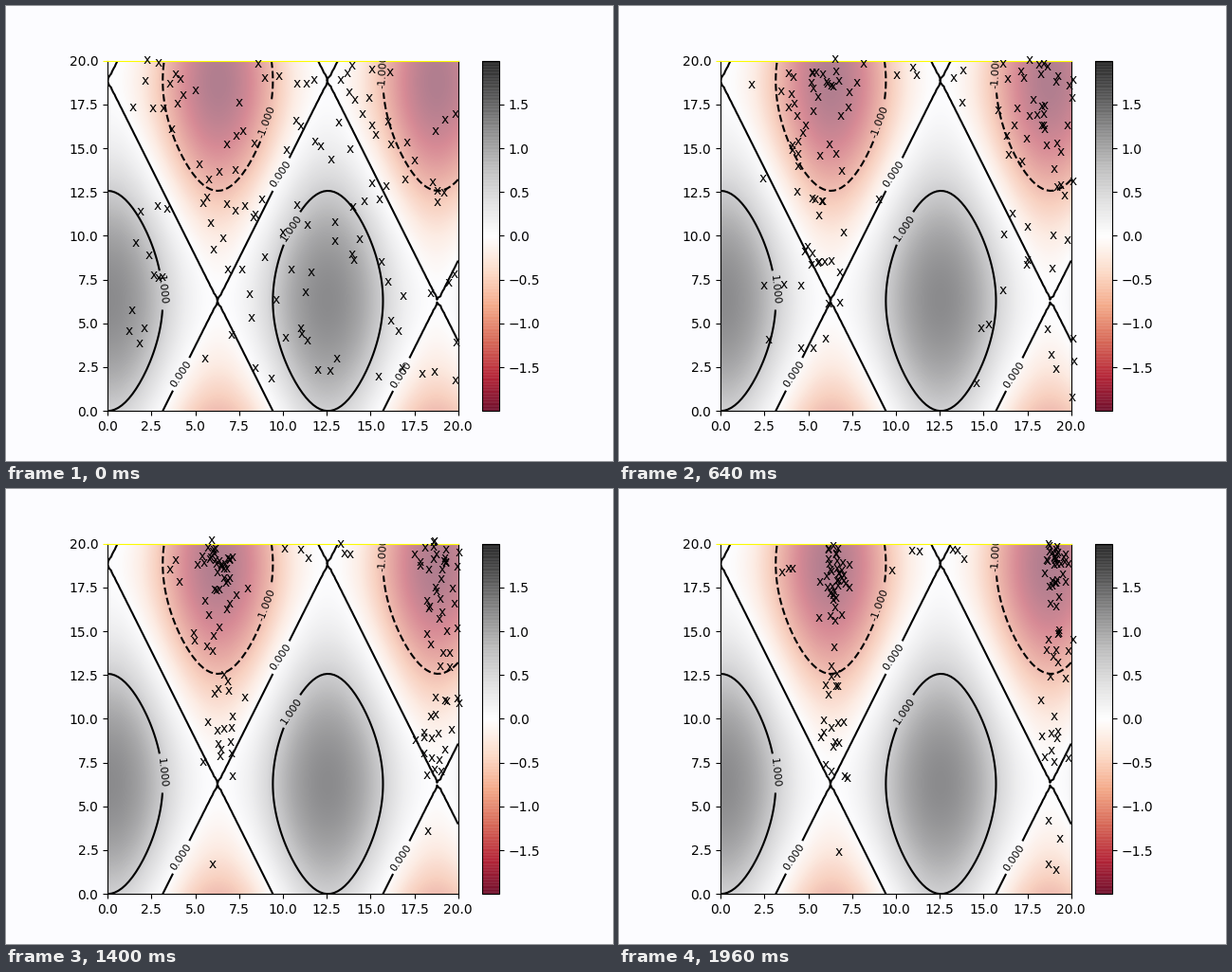
A matplotlib script that plays this animation: 640x480 px, repeating every 2000 ms.

```python
import numpy as np
import matplotlib.pyplot as plt
from matplotlib.animation import FuncAnimation

FRAMES, STEP_MS = 50, 40
SIZE = 120
PAPER, YELLOW = "#fcfcff", "#fcfc00"
LOW_X, LOW_Y = 2 * np.pi, 6 * np.pi    # lowest point; repeats 4 pi to the right

rng = np.random.default_rng(12)
# a few individuals stay stuck along the top edge
stuck_x = np.repeat([3.3, 10.3, 13.7], 3) + rng.normal(0, 0.5, 9)


def height(x, y):
    return np.cos(x / 2) + np.sin(y / 4)


def fold(v):
    """Reflect values back into 0..20."""
    v = np.abs(v)
    return np.where(v > 20, 40 - v, v)


def breed(gen):
    """Draw one generation: two columns that sway and tighten."""
    rest = 1 - gen / (FRAMES - 1)
    sway = 1.4 * rest * np.cos(2 * np.pi * (gen - 24) / 16)
    column = LOW_X + 4 * np.pi * (rng.random(SIZE) < 0.47)
    x = rng.normal(column + sway, 0.4 + 1.4 * rest ** 1.5)
    y = fold(rng.normal(LOW_Y, 0.5 + 0.5 * rest, SIZE))
    # flipped high bits of the coded y value
    for bit in range(1, 5):
        y -= 20 / 2 ** bit * (rng.random(SIZE) < 0.15 + 0.04 * bit)
    wild = rng.random(SIZE) < np.exp(-gen / 7)
    x = np.where(wild, rng.uniform(1, 20, SIZE), x)
    y = np.where(wild, rng.uniform(1.2, 20, SIZE), y)
    return np.column_stack([fold(x), fold(y)])


def evolve():
    history = []
    pop = breed(0)
    for gen in range(FRAMES):
        if gen:
            fresh = rng.random(SIZE) < 0.75
            pop = np.where(fresh[:, None], breed(gen), pop)
        stuck = np.column_stack([stuck_x + rng.normal(0, 0.08, len(stuck_x)),
                                 fold(rng.normal(19, 0.5, len(stuck_x)))])
        history.append(np.vstack([pop, stuck]))
    return history


history = evolve()

fig, ax = plt.subplots(figsize=(6.4, 4.8), dpi=100, facecolor=PAPER)
ax.set_facecolor(PAPER)

X, Y = np.meshgrid(np.linspace(0, 20, 100), np.linspace(0, 20, 100))
Z = height(X, Y)
lines = ax.contour(X, Y, Z, levels=[-1, 0, 1], colors="black")
ax.set(xlim=(0, 20), ylim=(0, 20))

# labels are placed before the axes become square, which sets their tilt
spots = [(9.02, 16.55), (15.72, 19.4), (9.84, 13.55), (4.19, 2.1),
         (16.73, 2.1), (3.12, 6.9), (10.43, 10.5)]
ax.clabel(lines, inline=True, fontsize=8, fmt="%1.3f", manual=spots)

image = ax.imshow(Z, extent=[0, 20, 0, 20], origin="lower",
                  cmap="RdGy", alpha=0.5, interpolation="bilinear")
bar = fig.colorbar(image, ax=ax)
bar.ax.set_facecolor(PAPER)
bar.solids.set(edgecolor="face", linewidth=0.25)

ax.set_yticks(np.arange(0, 20.1, 2.5))
ax.spines["top"].set_color(YELLOW)
ax.yaxis.get_major_ticks()[-1].tick1line.set_markeredgecolor(YELLOW)

marks = [ax.text(x, y, "x", zorder=4) for x, y in history[0]]


def update(gen):
    for mark, point in zip(marks, history[gen]):
        mark.set_position(point)
    return marks


anim = FuncAnimation(fig, update, frames=FRAMES, interval=STEP_MS,
                     init_func=lambda: update(0), repeat=True, repeat_delay=0)
plt.show()
```
